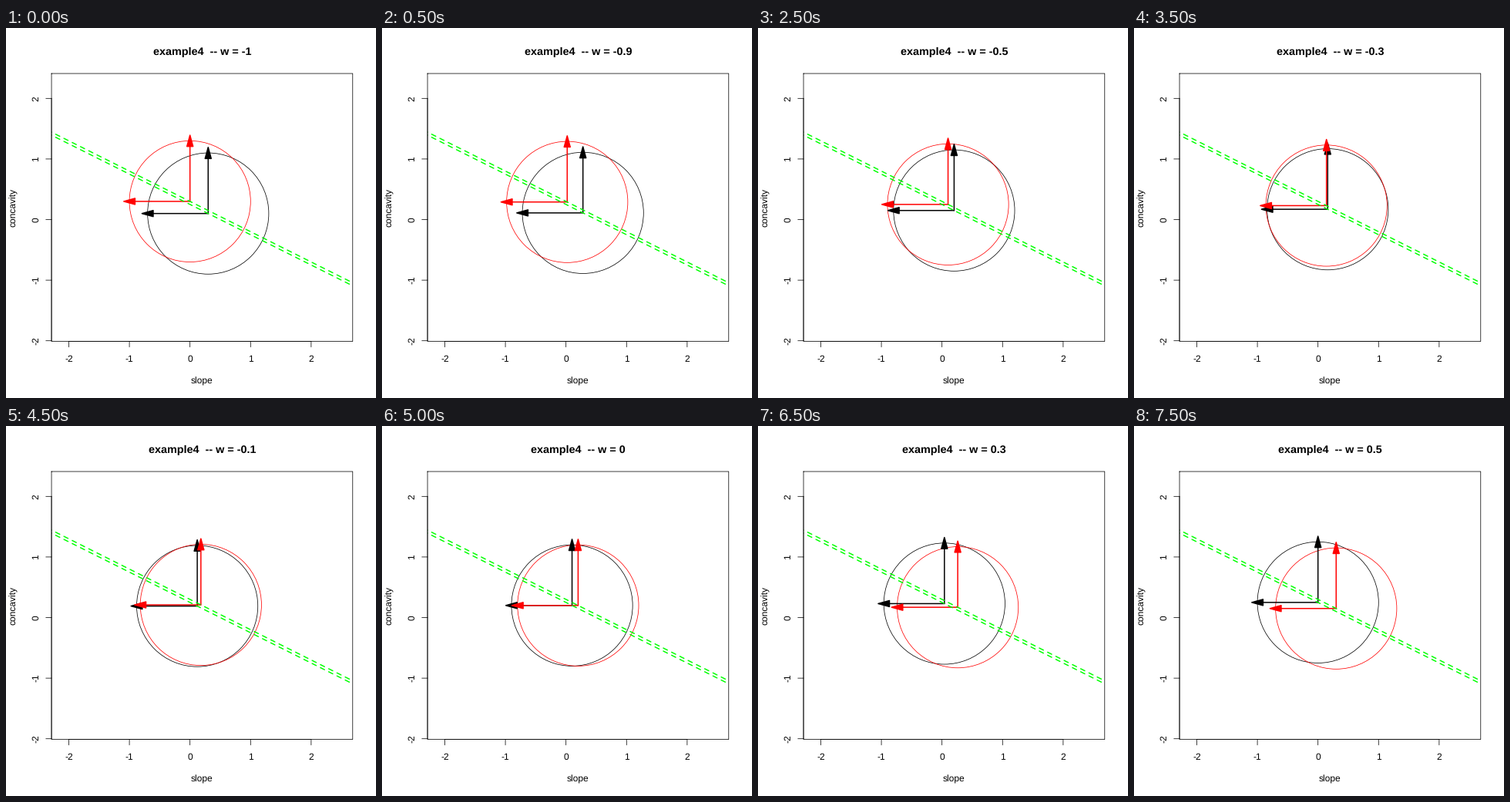
Write a matplotlib script that moves like this. It is 480 px wide and 480 px high and loops after 8 s.

```python
import numpy as np
import matplotlib.pyplot as plt
from matplotlib.animation import FuncAnimation
from matplotlib.patches import Circle, Polygon, Rectangle

SIZE, DPI = 480, 72          # 72 dpi makes one point equal one pixel
FRAMES, INTERVAL = 16, 500
LEFT, TOP, RIGHT, BOTTOM = 59.04, 59.04, 449.76, 406.56
UNIT = 78.6                  # pixels per data unit
MID = 0.2                    # data value at the centre of both axes
THIN, THICK = 0.75, 1.5
TICK = 7.2

plt.rcParams["font.family"] = "Liberation Sans"
plt.rcParams["text.hinting"] = "none"

fig = plt.figure(figsize=(SIZE / DPI, SIZE / DPI), dpi=DPI, facecolor="white")
ax = fig.add_axes([0, 0, 1, 1])
ax.set_xlim(0, SIZE)
ax.set_ylim(SIZE, 0)
ax.axis("off")


def px(x):
    return (LEFT + RIGHT) / 2 + (x - MID) * UNIT


def py(y):
    return (TOP + BOTTOM) / 2 - (y - MID) * UNIT


def stroke(xs, ys, color="black", lw=THIN, **kw):
    return ax.plot(xs, ys, color=color, lw=lw, snap=False, **kw)[0]


def label(x, y, s, size=12, **kw):
    return ax.text(x, y, s, fontsize=size, ha="center", va="baseline",
                   rotation_mode="anchor", **kw)


# triangular arrow heads, centred on the origin, in pixels
HALF_LEN, HALF_WIDTH = 7.3, 4.0
HEAD_LEFT = np.array([[-HALF_LEN, 0], [HALF_LEN, HALF_WIDTH],
                      [HALF_LEN, -HALF_WIDTH]])
HEAD_UP = HEAD_LEFT[:, ::-1]


class Frame:
    """Unit circle with a left and an up arrow from its centre."""

    def __init__(self, color, z):
        self.circle = ax.add_patch(Circle((0, 0), UNIT, fill=False, ec=color,
                                          lw=THIN, zorder=z))
        self.shafts = [stroke([], [], color, THICK, zorder=z + 2,
                              solid_capstyle="round") for _ in range(2)]
        self.heads = [ax.add_patch(Polygon(h, fc=color, ec=color, lw=THICK,
                                           joinstyle="round", snap=False,
                                           zorder=z + 2))
                      for h in (HEAD_LEFT, HEAD_UP)]

    def move(self, x, y):
        c = np.array([px(x), py(y)])
        self.circle.center = c
        ends = c + [-UNIT, 0], c + [0, -UNIT]
        shapes = HEAD_LEFT, HEAD_UP
        for end, shape, shaft, head in zip(ends, shapes, self.shafts, self.heads):
            shaft.set_data([c[0], end[0]], [c[1], end[1]])
            head.set_xy(shape + end)


# plot box, axis lines, ticks and labels
stroke([LEFT, RIGHT, RIGHT, LEFT, LEFT], [TOP, TOP, BOTTOM, BOTTOM, TOP], zorder=9)
stroke([px(-2), px(2)], [BOTTOM, BOTTOM], zorder=9)
stroke([LEFT, LEFT], [py(-2), py(2)], zorder=9)
for v in range(-2, 3):
    stroke([px(v), px(v)], [BOTTOM, BOTTOM + TICK], zorder=9)
    stroke([LEFT, LEFT - TICK], [py(v), py(v)], zorder=9)
    label(px(v), 433, str(v))
    label(42, py(v), str(v), rotation=90)
label(px(MID), 462, "slope")
label(13, py(MID), "concavity", rotation=90)
title = label(px(MID), 35, "", 14.4, weight="bold")

# paths followed by the two centres, running across the whole stage
window = Rectangle((LEFT, TOP), RIGHT - LEFT, BOTTOM - TOP, transform=ax.transData)
span = MID + (np.array([0, SIZE]) - px(MID)) / UNIT
for b in (0.25, 0.3):
    path = stroke(px(span), py(b - 0.5 * span), "#00ff00", THICK, zorder=8,
                  ls=(0, (4, 4)), dash_capstyle="round")
    path.set_clip_path(window)

black = Frame("black", 2)
red = Frame("red", 3)


def update(i):
    w = (i - 10) / 10
    title.set_text(f"example4  -- w = {w:g}")
    black.move(0.1 - 0.2 * w, 0.2 + 0.1 * w)
    red.move(0.2 + 0.2 * w, 0.2 - 0.1 * w)
    return []


anim = FuncAnimation(fig, update, frames=FRAMES, init_func=lambda: update(0),
                     interval=INTERVAL, repeat=True, repeat_delay=0, blit=False)
plt.show()
```
